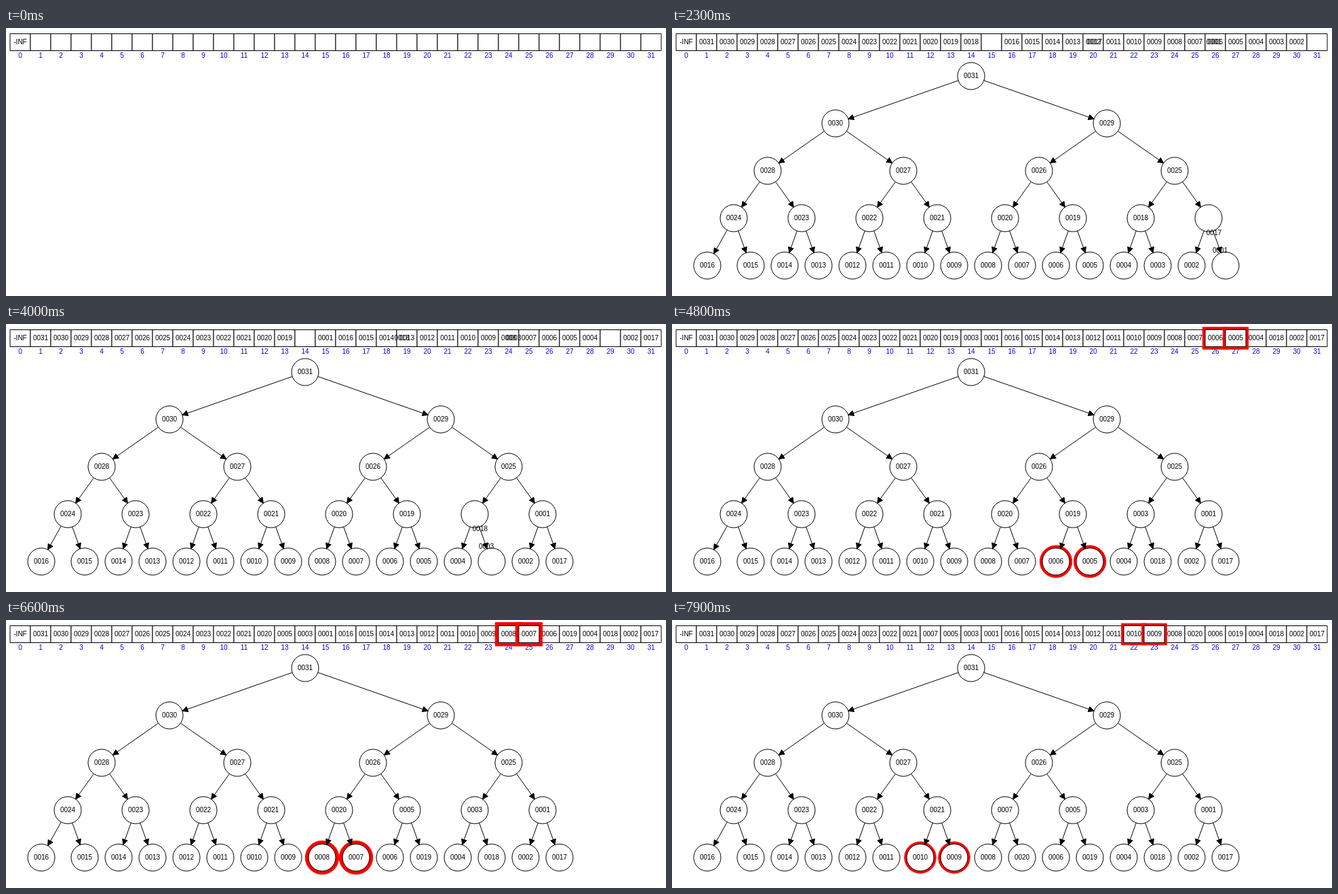
Animation of 973x396 px, one loop 8 s. Source, as an HTML page with a canvas:

```html
<!DOCTYPE html>
<html lang="en">
<head>
<meta charset="utf-8">
<title>Heap construction</title>
<style>
  html, body { margin: 0; width: 100%; height: 100%; overflow: hidden; background: #fff; }
  canvas { display: block; }
</style>
</head>
<body>
<canvas id="stage" width="973" height="396"></canvas>
<script>
const ctx = document.getElementById('stage').getContext('2d');

const LOOP = 8000, TICK = 100;
const BUILT = 500;               // values and tree appear
const START = 1002;              // first comparison
const CYCLE = 1700, STEP = CYCLE / 3;
const PULSE = 1588, PEAK = 7050; // highlight breathing
const SIZE = 32, RADIUS = 20, CELL_W = 30, CELL_H = 25;

const cellPos = i => ({ x: 21 + CELL_W * i, y: 21 });

function nodePos(i) {
  if (i === 16) return { x: 52, y: 351 };
  const level = Math.floor(Math.log2(i));
  const first = [441, 241, 141, 91, 66][level];
  const gap = 800 / 2 ** level;
  return { x: first + (i - 2 ** level) * gap, y: 71 + 70 * level };
}

const pad = n => String(n).padStart(4, '0');
const mix = (a, b, p) => ({ x: a.x + (b.x - a.x) * p, y: a.y + (b.y - a.y) * p });

function text(s, pos, color = '#000') {
  ctx.fillStyle = color;
  ctx.fillText(s, pos.x, pos.y);
}

function paint(path, fill, stroke) {
  ctx.fillStyle = fill;
  ctx.strokeStyle = stroke;
  ctx.beginPath();
  path();
  ctx.fill();
  ctx.stroke();
}

function drawCell(i, label, glow) {
  const c = cellPos(i);
  const box = d => () =>
    ctx.rect(c.x - CELL_W / 2 - d, c.y - CELL_H / 2 - d, CELL_W + 2 * d, CELL_H + 2 * d);
  if (glow) paint(box(glow), '#f00', '#f00');
  paint(box(0), '#fff', '#000');
  text(label, c);
}

function drawNode(i, label, glow) {
  const c = nodePos(i);
  const disc = r => () => ctx.arc(c.x, c.y, r, 0, 2 * Math.PI);
  if (glow) paint(disc(RADIUS + glow), '#f00', '#f00');
  paint(disc(RADIUS), '#fff', '#000');
  text(label, c);
}

function drawEdge(from, to) {
  const a = nodePos(from), b = nodePos(to);
  const len = Math.hypot(b.x - a.x, b.y - a.y);
  const ux = (b.x - a.x) / len, uy = (b.y - a.y) / len;
  const x = b.x - ux * RADIUS, y = b.y - uy * RADIUS;
  ctx.strokeStyle = '#000';
  ctx.beginPath();
  ctx.moveTo(a.x + ux * RADIUS, a.y + uy * RADIUS);
  ctx.lineTo(x, y);
  ctx.stroke();
  paint(() => {
    ctx.moveTo(x, y);
    ctx.lineTo(x - ux * 8 - uy * 4, y - uy * 8 + ux * 4);
    ctx.lineTo(x - ux * 8 + uy * 4, y - uy * 8 - ux * 4);
    ctx.closePath();
  }, '#000', '#000');
}

// Heap values, highlighted slots and the swap under way at time t.
function stateAt(t) {
  const values = Array.from({ length: SIZE }, (_, i) => SIZE - i);
  const state = { values, lit: [], swap: null };
  if (t < START) return state;
  const round = Math.floor((t - START) / CYCLE);
  for (let k = 0; k < round; k++) {
    const i = 15 - k, j = 2 * i + 1;
    [values[i], values[j]] = [values[j], values[i]];
  }
  const parent = 15 - round, child = 2 * parent + 1;
  const phase = ((t - START) % CYCLE) / STEP;
  if (phase < 1) state.lit = [child - 1, child];
  else if (phase < 2) state.lit = [parent, child];
  else state.swap = { parent, child, p: Math.min(1, (phase - 2) * 1.09) };
  return state;
}

function glowAt(t) {
  const turn = (((t - PEAK) / PULSE) % 1 + 1) % 1;
  return 3 + 8 * Math.abs(turn - 0.5);
}

function draw(t) {
  const { values, lit, swap } = stateAt(t);
  const built = t >= BUILT, glow = glowAt(t);
  const label = i => {
    if (i === 0) return '-INF';
    const moving = swap && (i === swap.parent || i === swap.child);
    return built && !moving ? pad(values[i]) : '';
  };

  ctx.fillStyle = '#fff';
  ctx.fillRect(0, 0, 973, 396);
  ctx.font = '10px "Liberation Sans", Arial, sans-serif';
  ctx.textAlign = 'center';
  ctx.textBaseline = 'middle';
  ctx.lineWidth = 1;

  for (let i = 0; i < SIZE; i++) {
    drawCell(i, label(i));
    text(i, { x: cellPos(i).x, y: 41 }, '#00f');
    if (built && i) drawNode(i, label(i));
  }
  for (const i of lit) {
    drawCell(i, label(i), glow);
    drawNode(i, label(i), glow);
  }
  if (swap) {
    const { parent, child, p } = swap;
    for (const place of [cellPos, nodePos]) {
      text(pad(values[parent]), mix(place(parent), place(child), p));
      text(pad(values[child]), mix(place(child), place(parent), p));
    }
  }
  if (built) for (let i = 2; i < SIZE; i++) drawEdge(i >> 1, i);
}

const origin = performance.now();
function frame() {
  const t = (performance.now() - origin) % LOOP;
  draw(Math.floor(t / TICK) * TICK);
  requestAnimationFrame(frame);
}
frame();
</script>
</body>
</html>
```
